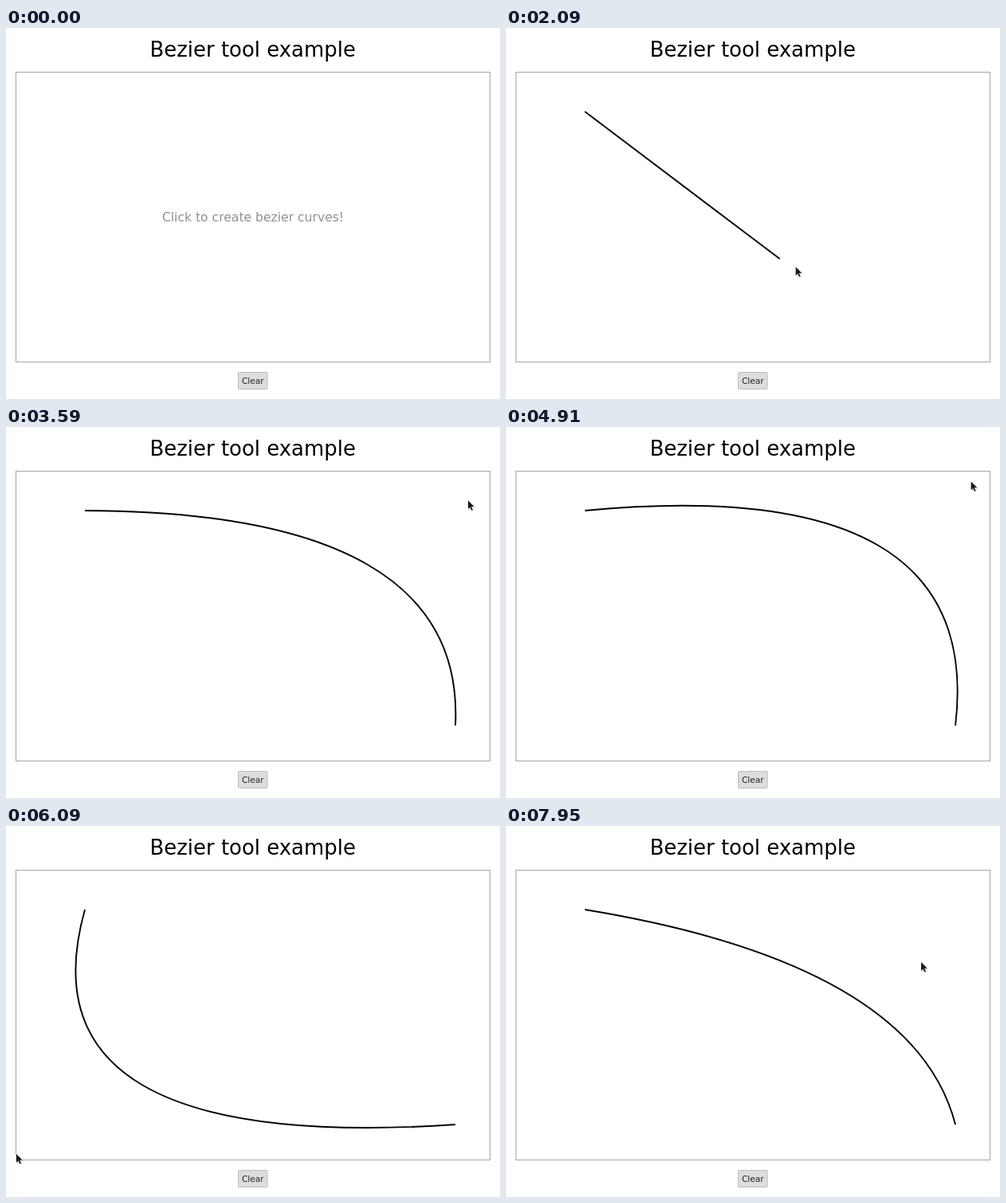
Animation, 620 px wide and 466 px high, one loop 8 s. Source, as an HTML page:

```html
<!DOCTYPE html>
<html lang="en">
<head>
<meta charset="utf-8">
<title>Bezier tool example</title>
<style>
  html, body { margin: 0; width: 100%; height: 100%; overflow: hidden; background: #fff; }
  svg { display: block; width: 620px; height: 466px; font-family: "DejaVu Sans", sans-serif; }
  text { text-anchor: middle; }
</style>
</head>
<body>
<svg viewBox="0 0 620 466">
  <text x="309.7" y="36" font-size="25.95">Bezier tool example</text>
  <rect x="12.5" y="55.5" width="595" height="364" fill="none" stroke="#a6a6a6"/>
  <text id="hint" x="310" y="243" font-size="15.6" fill="#909090">Click to create bezier curves!</text>
  <rect x="291.5" y="432.5" width="36.5" height="21" rx="1" fill="#ddd" stroke="#bbb"/>
  <text x="309.8" y="446.8" font-size="10.6" fill="#222">Clear</text>
  <path id="curve" fill="none" stroke="#000" stroke-width="1.9"/>
  <g id="pointer">
    <path d="M1 1V12L3.4 10 5 13.5 7 12.5 5.5 9H9Z" fill="#000" opacity=".25"/>
    <path d="M0 0V10.8L2.5 8.5 4.2 12.4 5.9 11.6 4.2 7.8 7.6 7.6Z" fill="#1a1a1a" stroke="#fff" stroke-width=".9" paint-order="stroke"/>
  </g>
</svg>
<script>
  const LOOP = 8000, FPS = 22;
  const ENTRY = [563, 485], START = [99, 105], END = [564, 375];
  const POINTER_IN = 6, FIRST_CLICK = 28, DRAW = 34, SECOND_CLICK = 60;

  // Pointer moves between pauses: steps, goal, braking power and sideways bend in pixels.
  const moves = [
    { from: 5, to: 20, goal: START, brake: 1.3 },
    { from: 33, to: 59, goal: END, brake: 1.35, bend: 38 },
    { from: 67, to: 85, goal: [588, 49], brake: 1.83, bend: -12 },
    { from: 85, to: 94, goal: [602, 57] },
    { from: 107.6, to: 129, goal: [19, 420], brake: 1.7 },
    { from: 131, to: 133, goal: [13, 412] },
    { from: 148, to: 175, goal: [521, 171], brake: 1.25, bend: -48 }
  ];

  function pointerAt(step) {
    let place = ENTRY;
    for (const { from, to, goal, brake = 1, bend = 0 } of moves) {
      if (step <= from) break;
      if (step >= to) { place = goal; continue; }
      const done = 1 - (1 - (step - from) / (to - from)) ** brake;
      const dx = goal[0] - place[0], dy = goal[1] - place[1];
      const side = bend * Math.sin(Math.PI * done) / Math.hypot(dx, dy);
      return [place[0] + dx * done - dy * side, place[1] + dy * done + dx * side];
    }
    return place;
  }

  // Steps begin on whole hundredths of a second.
  const stepTime = step => 10 * Math.round(step * 100 / FPS);

  function stepAt(time) {
    const step = Math.ceil(time * FPS / 1000);
    return stepTime(step) > time ? step - 1 : step;
  }

  const [hint, curve, pointer] = ["hint", "curve", "pointer"].map(id => document.getElementById(id));
  const show = (element, visible) => element.setAttribute("visibility", visible ? "visible" : "hidden");

  function draw(time) {
    const step = stepAt(time);
    const control = pointerAt(step - 1); // the curve trails the pointer by one step
    const end = step <= SECOND_CLICK ? control : END;
    show(hint, step < FIRST_CLICK);
    show(curve, step > DRAW);
    show(pointer, step >= POINTER_IN);
    curve.setAttribute("d", `M${START}Q${control} ${end}`);
    pointer.setAttribute("transform", `translate(${pointerAt(step)})`);
  }

  const began = performance.now();
  function tick() {
    draw((performance.now() - began) % LOOP);
    requestAnimationFrame(tick);
  }
  tick();
</script>
</body>
</html>
```
